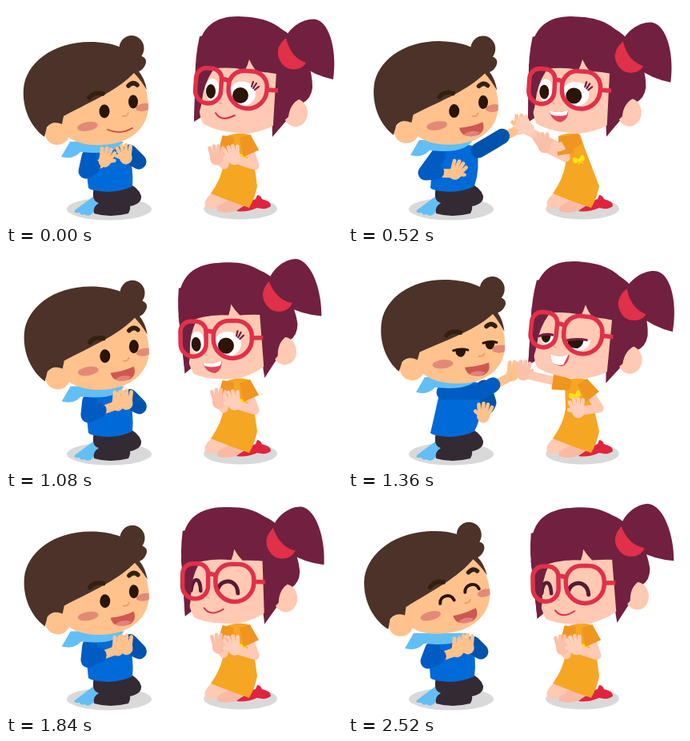
Recreate the animation shown at these times as an HTML page with a canvas. Size 420x272 px, loop 2560 ms.

```html
<!DOCTYPE html>
<html lang="en">
<head>
<meta charset="utf-8">
<title>Hand-clapping game</title>
<style>
html, body { margin: 0; width: 100%; height: 100%; overflow: hidden; background: #fff; }
canvas { display: block; }
</style>
</head>
<body>
<canvas id="stage" width="420" height="272"></canvas>
<script>
const ctx = document.getElementById('stage').getContext('2d');
const LOOP = 2560, STEP = 40;
const BROWN = '#4c3228', BROW = '#33200f', BOY = '#ffc28d', BLUE = '#006ad8', SKY = '#62bff5';
const PLUM = '#72203f', GIRL = '#ffc9b3', RED = '#e0304a', ORANGE = '#f5a623', SLEEVE = '#f0951f', EYE = '#2b1408';

// Arms at rest, in the first clap and in the second: elbow x, y, hand x, y, hand angle
const arms = {
  boyNear: [[100, 207, 138, 190, 20], [97, 209, 136, 206, 30], [167, 177, 207, 151, 20]],
  boyFar: [[166, 195, 149, 186, -10], [180, 171, 216, 149, 18], [176, 190, 170, 203, 12]],
  girlFar: [[273, 199, 268, 187, 0], [272, 190, 244, 172, -18], [250, 161, 219, 150, 0]],
  girlNear: [[311, 200, 284, 187, -17], [280, 189, 252, 179, -45], [314, 197, 287, 197, -10]]
};

const ease = u => (u = Math.min(1, Math.max(0, u))) * u * (3 - 2 * u);
const bump = (t, on, off, span) => ease((t - on) / span) - ease((t - off) / span);
const peak = (t, at, span) => ease(1 - Math.abs(t - at) / span);

function poseAt(t) {
  const first = bump(t, 80, 680, 320), second = bump(t, 1040, 1560, 320);
  const settle = ease(t / 280), finish = ease((t - 1900) / 620);
  const sway = bump(t, 40, 320, 240) + bump(t, 840, 1120, 240) + ease((t - 1640) / 320);
  const tap = bump(t, 280, 560, 200);
  const mix = (rest, a, b) => rest + (a - rest) * first + (b - rest) * second;
  const pose = { sway, settle, shift: mix(0, -13, -5), bow: [mix(297, 289, 284), mix(187, 192, 180)] };
  for (const name in arms) {
    const [rest, a, b] = arms[name];
    pose[name] = rest.map((v, i) => mix(v, a[i], b[i]));
  }
  pose.boyNear[2] -= 13 * (1 - settle);
  pose.girlFar[2] -= 5 * (1 - settle);
  pose.girlNear[0] -= 16 * tap;
  pose.girlNear[1] -= 12 * tap;
  pose.girlNear[2] -= 30 * tap;
  pose.girlNear[3] -= 28 * tap;
  pose.boyHead = [62 + 9 * first + 16 * second + 2 * finish, 160 - 2 * first - 12 * second + 2 * finish,
    1.5 * first + 4 * second - 4 * finish];
  pose.girlHead = [347.5 - 10 * settle - 2 * sway + 13 * finish, 148 - 7 * sway + 2 * second, 2 * second - 8 * sway];
  pose.lid = .45 * (peak(t, 280, 240) + peak(t, 1360, 240) + peak(t, 2040, 240));
  return pose;
}

function fill(color, d) {
  ctx.fillStyle = color;
  ctx.fill(new Path2D(d));
}
function line(color, width, d, cap = 'round') {
  ctx.strokeStyle = color;
  ctx.lineWidth = width;
  ctx.lineCap = cap;
  ctx.lineJoin = 'round';
  ctx.stroke(new Path2D(d));
}
function oval(color, x, y, rx, ry, deg = 0) {
  ctx.fillStyle = color;
  ctx.beginPath();
  ctx.ellipse(x, y, rx, ry, deg * Math.PI / 180, 0, 7);
  ctx.fill();
}
function group(x, y, deg, draw) {
  ctx.save();
  ctx.translate(x, y);
  ctx.rotate(deg * Math.PI / 180);
  draw();
  ctx.restore();
}

function hand([, , x, y, deg], skin, thumb) {
  group(x, y, deg, () => {
    oval(skin, 0, 4, 8, 8.5);
    for (let i = 0; i < 4; i++) {
      const tip = -8.5 + i * 5.6;
      line(skin, 4.7, `M${tip * .6} 3L${tip} ${-9 - (i % 3 ? 2.5 : 0)}`);
    }
    line(skin, 4.7, `M0 6L${11 * thumb} 0`);
  });
}
function longSleeveArm(x, y, [ex, ey, hx, hy], color) {
  line(BOY, 11, `M${ex} ${ey}L${hx} ${hy + 4}`);
  line(color, 19, `M${x} ${y}L${ex} ${ey}L${ex + (hx - ex) * .35} ${ey + (hy - ey) * .35}`);
}
function shortSleeveArm(x, y, [ex, ey, hx, hy]) {
  line(GIRL, 11, `M${(x + ex) / 2} ${(y + ey) / 2}L${ex} ${ey}L${hx} ${hy + 4}`);
  group(x, y, Math.atan2(ey - y, ex - x) * 180 / Math.PI, () => fill(SLEEVE, 'M-4 -7L18 -11L20 10L-4 7Z'));
}

// Pupil on an optional white, cut off from above by the lid
function eye(x, y, rx, ry, lid, white) {
  const top = y - ry + 2 * ry * lid;
  ctx.save();
  ctx.beginPath();
  ctx.rect(x - 30, lid > .08 ? top : 0, 60, 200);
  ctx.clip();
  if (white) oval('#fff', x + 2, y - 2, white, ry * 1.55);
  oval(EYE, x, y, rx, ry);
  ctx.restore();
  if (lid > .08) line(white ? PLUM : EYE, 3, `M${x - rx * 1.4} ${top + 2}Q${x} ${top - 2} ${x + rx * 1.4} ${top}`);
}
function happyEye(x, y, w, h, color, weight, tilt) {
  group(x, y, tilt, () => line(color, weight, `M${-w} ${h}C${-w * .8} ${-h} ${w * .8} ${-h} ${w} ${h}`));
}

function boyHead(lid, t) {
  const face = 'M69 122L162 80C172 90 178 110 178 127C177 150 160 168 132 173C104 177 80 172 69 155Z';
  oval(BOY, 64, 160, 15, 14);
  fill(BOY, face);
  ctx.save();
  ctx.clip(new Path2D(face));
  oval('#e38a76', 102, 151, 13, 5.5, -10);
  oval('#e38a76', 172, 127, 10, 4.8, -10);
  ctx.restore();
  fill(BROWN, `M48 164C30 151 20 127 22 103C25 72 58 45 105 45C120 45 132 47 144 52L168 62
    Q176 65 175 71C173 78 169 81 166 82Q173 90 176 105Q167 91 160 84C140 105 110 118 72 138L70 148Q58 143 51 152Z`);
  oval(BROWN, 157, 53, 15.5, 16);
  line(BROW, 5.5, 'M104 115Q110 107 121 110');
  line(BROW, 5.5, 'M153 100Q159 94 164 99');
  line('#ea9b6c', 1.8, 'M146 138Q151 139 153 134');
  if (t >= 2200) {
    happyEye(123, 130, 9, 5, EYE, 4, -10);
    happyEye(155, 118, 9, 5, EYE, 4, -10);
  } else {
    eye(123, 132, 6.5, 8.5, lid);
    eye(159, 120, 6, 8.5, lid);
  }
  if (t < 160) {
    line('#ce4a3d', 1.8, 'M127 155Q143 162 158 153');
  } else {
    group(145, 154, 0, () => {
      fill('#cf5850', 'M-15 -1Q2 -3 14 -9Q18 2 9 7Q-2 11 -10 7Q-14 4 -15 -1Z');
      fill('#e2837b', 'M-9 7Q0 0 11 4Q7 8 2 9Q-4 10 -9 7Z');
    });
  }
}

function boy(p, t) {
  const [x, y, rot] = p.boyHead, dx = x - 62, dy = y - 160;
  oval('#d9d9d9', 129, 254.5, 53, 14);
  fill(SKY, 'M113 236Q99 246 86 256Q84 260 92 259Q93 263 98 261Q103 265 108 260L118 246Z');
  fill('#342a34', 'M110 228Q106 244 116 247Q108 252 110 260Q130 266 153 260Q156 254 155 251Q170 248 169 238Q165 226 150 222Z');
  fill(BLUE, `M${100 + dx} ${182 + dy}Q${126 + dx} ${172 + dy} ${152 + dx} ${178 + dy}
    Q${160 + dx * .6} 204 158 226Q146 232 128 233Q106 232 103 228Q${100 + dx * .5} 207 ${100 + dx} ${182 + dy}Z`);
  longSleeveArm(154 + dx, 183 + dy, p.boyFar, '#0053ac');
  longSleeveArm(104 + dx, 189 + dy, p.boyNear, '#005cc3');
  group(dx, dy, 0, () => fill(SKY, 'M69 189L80 170L147 170Q138 185 108 184L93 183Q84 193 69 189Z'));
  group(x, y, rot, () => {
    ctx.translate(-62, -160);
    boyHead(p.lid, t);
  });
  hand(p.boyFar, BOY, -1);
  hand(p.boyNear, BOY, 1);
}

function girlFace(lid, t) {
  line('#f0a58f', 1.6, 'M268 116Q264 121 269 122');
  if (t >= 1560) {
    happyEye(254, 103, 6, 9, '#5a1a30', 4.5, 6);
    happyEye(294, 107, 13, 9, '#5a1a30', 5, 10);
  } else {
    eye(256, 107, 6, 9, lid, 9);
    eye(293, 112, 10, 10, lid, 17);
    if (lid < .25) line(PLUM, 2.2, 'M307 101L309 95M309 103L313 97M311 105L316 101');
  }
  if (t < 160 || t >= 1800) {
    line('#d9364c', 2, 'M262 134Q269 146 286 137');
  } else {
    const teeth = t >= 1160;
    group(273, 135, 0, () => {
      fill('#e0455a', 'M-11 -5Q0 0 13 -5Q13 7 4 10Q-8 9 -11 -5Z');
      fill('#fff', teeth ? 'M-11 -5Q0 0 12 -5L6 8Q0 10 -8 5Z' : 'M-11 -5Q0 0 13 -5L11 1Q0 4 -9 0Z');
    });
  }
}

function glasses() {
  line(RED, 5.5, 'M269 93Q274 90 279 95M326 105L340 106', 'butt');
  for (const [x, y, w, h] of [[253, 100, 32, 44], [302, 105, 48, 47]]) {
    group(x, y, 4, () => {
      ctx.beginPath();
      ctx.roundRect(-w / 2, -h / 2, w, h, [w * .4, w * .4, w / 2, w / 2]);
      ctx.stroke();
    });
  }
}

function girlHead({ sway, settle, lid }, t) {
  const slide = draw => group(302 - 2 * sway, 105 + 6 * sway, 3 * sway, () => {
    ctx.translate(-302, -105);
    draw();
  });
  fill(PLUM, `M235 145C237 110 236 80 239 60C243 25 262 13 290 13C315 14 330 17 346 30
    C372 45 384 80 383 103Q381 117 370 122L352 142L333 164L331 85Z`);
  oval(GIRL, 362, 134, 15, 17.5);
  fill(GIRL, 'M240 82C239 110 240 135 246 147Q262 158 300 160Q320 158 336 149L339 80L303 62Z');
  slide(() => girlFace(lid, t));
  fill(PLUM, 'M237 72L235 145Q243 136 245 118Q247 98 259 80Z');
  fill(PLUM, 'M237 88Q236 65 242 38L344 30L344 86Q328 83 313 82Q308 76 304 67Q302 75 299 80Q268 74 243 83Z');
  fill(PLUM, 'M338 82L333 164Q344 146 353 139Q355 122 368 116L380 100L360 55Z');
  slide(glasses);
  group(5 * settle, 5 * settle, 0, () => {
    fill(PLUM, 'M346 48C352 25 375 14 388 17C406 22 414 60 409 92Q385 87 365 72Q350 63 346 48Z');
    fill(RED, 'M350 40Q338 50 340 62Q346 82 364 79Q372 77 375 71Q356 65 350 40Z');
  });
}

function girl(p, t) {
  const dx = p.shift, [x, y, rot] = p.girlHead;
  oval('#d9d9d9', 293, 254, 46, 13.5);
  fill('#e0243e', 'M288 257Q300 246 312 242L314 237Q318 237 320 242Q332 245 331 251Q325 256 314 253Q300 259 288 257Z');
  fill('#f8baa4', 'M272 238Q262 252 264 257Q274 261 287 257L300 249Z');
  fill(GIRL, 'M260 232Q243 246 251 253Q258 257 268 249L284 240Z');
  fill(ORANGE, `M${276 + dx} 163Q${290 + dx} 157 ${303 + dx} 161L${307 + dx} 173L314 226
    Q311 241 304 253Q280 245 256 235Q270 215 272 197Z`);
  group(...p.bow, -15, () => {
    fill('#ffe313', 'M0 0Q-9 -8 -8 2Q-6 6 0 1Q7 7 7 -1Q6 -8 0 0L-4 8L0 4L5 8Z');
  });
  shortSleeveArm(277 + dx * .5, 167, p.girlFar);
  shortSleeveArm(300 + dx, 167, p.girlNear);
  group(x, y, rot, () => {
    ctx.translate(-347.5, -148);
    girlHead(p, t);
  });
  hand(p.girlFar, '#fbc0a9', 1);
  hand(p.girlNear, '#ffcfbb', -1);
}

function render(now) {
  const t = Math.floor(now % LOOP / STEP) * STEP;
  const pose = poseAt(t);
  ctx.fillStyle = '#fff';
  ctx.fillRect(0, 0, 420, 272);
  boy(pose, t);
  girl(pose, t);
}

let start;
function tick(now) {
  start ??= now;
  render(now - start);
  requestAnimationFrame(tick);
}
render(0);
requestAnimationFrame(tick);
</script>
</body>
</html>
```
